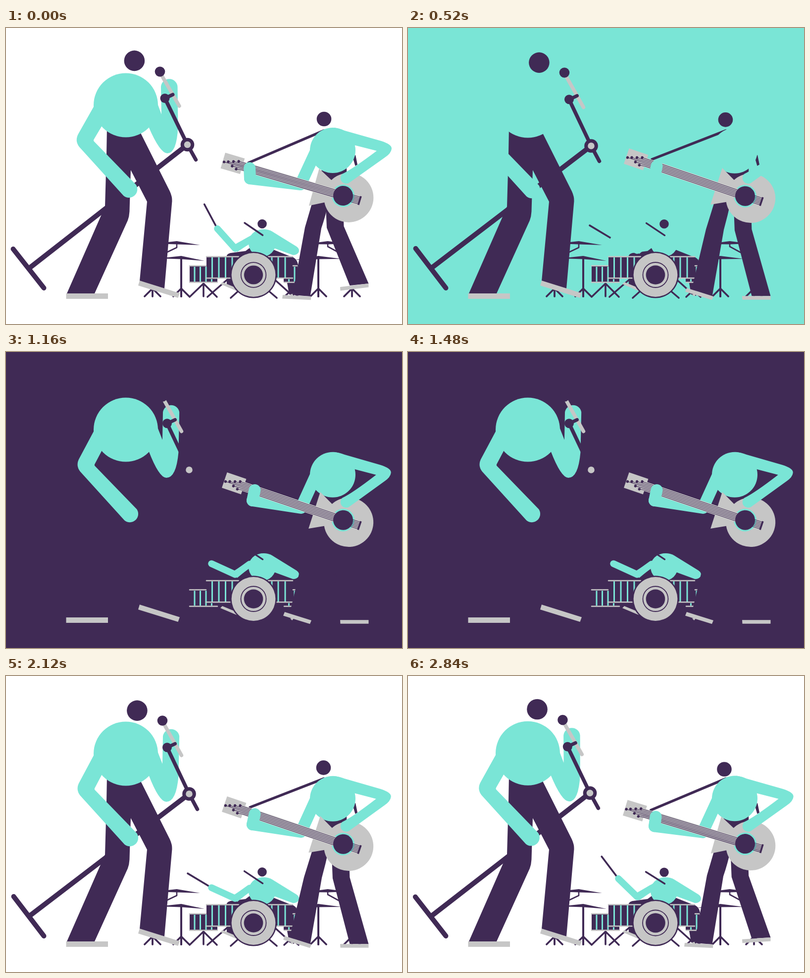
Animation of 800 by 600 pixels, one loop 2880 ms. Source, as an HTML page with a canvas:

```html
<!DOCTYPE html>
<html lang="en">
<head>
<meta charset="utf-8">
<title>Band</title>
<style>
html, body { margin: 0; width: 100%; height: 100%; overflow: hidden; }
canvas { display: block; width: 100vw; height: 100vh; }
</style>
</head>
<body>
<canvas id="stage" width="800" height="600"></canvas>
<script>
const ctx = document.getElementById('stage').getContext('2d');
const TEAL = '#7ae5d6', DARK = '#402a55', GRAY = '#c6c6c6';
const LOOP = 2880, STEP = 40, BEAT = 320;
const SCENES = [TEAL, DARK, '#ffffff'];

function shape(d, color) {
  ctx.fillStyle = color;
  ctx.fill(new Path2D(d));
}
function disc(x, y, r, color) {
  ctx.fillStyle = color;
  ctx.beginPath();
  ctx.arc(x, y, r, 0, Math.PI * 2);
  ctx.fill();
}
function line(d, width, color = DARK, cap = 'round') {
  ctx.strokeStyle = color;
  ctx.lineWidth = width;
  ctx.lineCap = cap;
  ctx.lineJoin = 'round';
  ctx.stroke(new Path2D(d));
}
function box(x1, y1, x2, y2, color) {
  ctx.fillStyle = color;
  ctx.fillRect(x1, y1, x2 - x1, y2 - y1);
}

// Movement values for one beat; sway and swing run 0..1 between the poses.
function poseAt(t) {
  const a = (t % BEAT) / BEAT * Math.PI * 2;
  return {
    sway: (1 - Math.cos(a - Math.PI / 8) / 0.924) / 2,
    swing: (1 - Math.cos(a)) / 1.707,
    nod: -0.495 + 0.495 * Math.cos(a) - 1.62 * Math.sin(a),
    slide: -11.9 * Math.sin(a),
    heel: Math.max(0, -Math.cos(a)) / 0.707,
    lift: (1 + Math.cos(a - 0.96)) / 1.574
  };
}

function tripod(x) {
  line(`M${x} 528V544M${x} 528L${x - 16} 544M${x} 528L${x + 16} 544`, 3.8);
}

function cymbals() {
  shape('M300 437L345 432L392 440L345 438.5Z', DARK);
  line('M345 436V445L322 456', 2.6);
  shape('M308 467L354 462L401 472L354 468.5Z', DARK);
  line('M354 466V544', 4);
  shape('M604 438L650 432L690 437L650 438.5Z', DARK);
  line('M650 436V443L672 455', 2.6);
  shape('M584 470L631 462L678 468L631 468.5Z', DARK);
  line('M631 466V544', 4);
  [296, 354, 631, 699].forEach(tripod);
}

function drummer({ sway, swing, nod }) {
  line('M399 516V544M399 518L371 545M399 518L426 545M447 510L407 545', 3.6);
  line('M545 512L576 540M562 545L576 532L591 545', 3.6);
  line('M474 529L454 547M526 529L547 547', 3.6);
  shape('M445 464Q446 456 458 455.5L484 452L492 446L542 450L572 462Q588 465 590 480' +
    'L582 543L572 540L560 470H470V530L446 524Z', DARK);
  shape('M437 515L466 527V533L433 519Z', GRAY);
  shape('M574 540L583 538L578 544Z', GRAY);

  const hx = 427 - 12 * swing, hy = 406.8 + 22.2 * swing, ey = 447 + 4 * swing;
  const tilt = (62 - 31 * sway) * Math.PI / 180;
  line(`M${hx} ${hy}l${-56 * Math.cos(tilt)} ${-56 * Math.sin(tilt)}`, 3.6);
  disc(517.5, 436, 27.5, TEAL);
  shape(`M517 408L460 ${ey - 7}L467 ${ey + 7}L491 438Z`, TEAL);
  line(`M492 430L463 ${ey}L${hx} ${hy}`, 13.5, TEAL);
  shape('M512 409Q526 406 537 412L587 443Q594 448 591 455Q587 461 579 460L541 446Z', TEAL);
  disc(517.5, 397 + nod * 0.8, 9.3, DARK);
  line(`M${482 - 1.5 * nod} ${395 + 2 * nod}L518.5 ${420 + nod}`, 3.4);
}

function drums({ nod }) {
  box(371, 483, 404, 515, DARK);
  box(405, 508, 427, 515, DARK);
  box(405, 464, 470, 507, DARK);
  box(536, 464, 580, 507, DARK);
  box(561, 508, 582, 515, DARK);
  box(584, 484, 589, 516, DARK);
  line('M381 484V514M392.5 484V514M404 484V514M415.5 509V514M571.5 509V514M583 484V514',
    3, TEAL, 'butt');
  line('M416.5 465V506M430 465V506M443.5 465V506M457 465V506M537 465V506M550 465V506M564 465V506',
    3, TEAL, 'butt');
  line('M371 482H404M405 463.5H470M404 507H455M371 515.5H427', 2.6, GRAY);
  line('M530 463.5H579M546 507H579M580 482H588M562 515.5H582', 2.6, GRAY);
  const pulse = 0.7 * nod;
  disc(500, 500.5, 47, DARK);
  disc(500, 500.5, 44.4, GRAY);
  disc(500, 500.5, 26.2 + pulse, DARK);
  disc(500, 500.5, 24.4 + pulse, GRAY);
  disc(500, 500.5, 19.1 + pulse, DARK);
}

function singer({ sway: s }) {
  const rx = 366.5 + 3.5 * s, ry = 236.5 + 2.5 * s;
  line(`M${rx} ${ry}L48 486`, 10);
  line(`M${14.5 + s} ${448 - s}L76.5 527`, 10);

  shape('M204 200L203 256L200 362L123 538H179L246 390Q249 382 249.5 372L252 288L285 352L270 513' +
    'L320 528L335.5 351Q336 342 331 331L268 205Z', DARK);
  box(121.5, 538, 206, 549, GRAY);
  shape('M270 512L351 537.5L347.5 547L267 522Z', GRAY);

  const x = 1.8 * s, y = 1.3 * s;
  disc(242, 156.5 + s, 65, TEAL);
  shape(`M178 ${158 + y}L${147 + x} ${213 + y}Q${138 + x} ${228 + y} ${148 + x} ${241 + y}
    L${237.5 + x} ${340 + y}A17 17 0 0 0 ${262.5 + x} ${317.5 + y}
    L${178 + x} ${230 + y}Q${176 + x} ${228 + y} ${178 + x} ${225 + y}L194 ${198 + y}Z`, TEAL);
  shape(`M303 145L${314 + 2 * s} ${175 + 3 * s}L${313 + 4 * s} ${120 + 2 * s}
    A16.8 16.8 0 0 1 ${346.6 + 3.6 * s} ${120 + 2 * s}L${347.5 + s} ${200 + 3 * s}
    Q${345 - s} ${254 + s} ${326 - 2 * s} ${254 + s}Q${311 - 2 * s} ${254 + s} 288 200Z`, TEAL);

  const jx = 321 + 4.5 * s, jy = 142.5 + 2.3 * s;
  line(`M${314 + 5 * s} ${95 + 2 * s}L${350 + 4.5 * s} ${158 + 2.8 * s}`, 7.4, GRAY);
  disc(311 + 5 * s, 88.5 + 2 * s, 10.3, DARK);
  disc(jx, jy, 9.5, DARK);
  line(`M${jx} ${jy}l16 -7.5`, 7);
  line(`M${jx} ${jy}L${rx} ${ry}L${383.5 + 3 * s} ${267 + 3 * s}`, 7.5);
  disc(rx, ry, 13.8, DARK);
  disc(rx, ry, 6.8, GRAY);
  disc(259.4 + 5.5 * s, 66.4 + 3.7 * s, 20.8, DARK);
}

// Drawn along its own axis, with the sound hole at the origin.
function guitar() {
  disc(12, 0.5, 50, GRAY);
  shape('M-62 -39L-32 -24L0 -20V22L-31 23L-60.5 39Z', GRAY);
  box(-253, -16, -212, 17, GRAY);
  box(-213, -9, -15, 9.8, GRAY);
  disc(0, 0, 23, TEAL);
  box(-26, -9, -15, 9.8, GRAY);
  const pegs = [[-222, -7], [-232, -3.7], [-242, -0.3], [-250, 2.6], [-232, 6], [-222.5, 9.5]];
  pegs.forEach(([x, y], i) => {
    const v = -6.8 + 2.9 * i;
    line(`M${x} ${y}L-211 ${v}L-15 ${v}L34 ${v - 0.5}`, 1.1);
    disc(x, y, 2.7, DARK);
  });
  disc(0, 0, 20, DARK);
  line('M34.8 -9.3V9', 3.6, DARK, 'butt');
}

function guitarist({ sway, swing, nod, slide, heel: k, lift: q }) {
  const angle = (16.5 + 2.3 * swing) * Math.PI / 180;
  const gx = 681, gy = 340 + 0.7 * swing;
  const cos = Math.cos(angle), sin = Math.sin(angle);
  const onNeck = (u, v) => `${gx + u * cos - v * sin} ${gy + u * sin + v * cos}`;

  line(`M${onNeck(-202, -10)}L642 208`, 5.2);
  shape('M706 257L710 277L705.5 279.5L701 264Z', DARK);

  const kx = 660 - 12 * q, hemL = 543.5 - 21.5 * q, hemR = 543.5 - 25.5 * q;
  shape(`M${kx - 2} 360L${kx} ${410 - 5 * q}L694.5 ${hemL}L732.5 ${hemR}
    L${kx + 34.5} ${408 - 6 * q}L${kx + 33} 360Z`, DARK);
  shape(`M675 ${543.5 - 18.5 * q}L732.5 ${hemR}V${551 - 25.5 * q}L675.5 ${551 - 18.5 * q}Z`, GRAY);
  shape(`M640 280H688L690 350L652 351Q646 380 ${637 + k} ${406 + 3 * k}L614.5 544
    L${579 - 6 * k} ${541 - 11 * k}L${604 - 2 * k} ${404 + 4 * k}L618 356Z`, DARK);
  shape(`M${559 + 4 * k} ${541 - 14 * k}L${616.3 + 0.7 * k} 544L${616 - 2 * k} 551.3
    L${558 + 2 * k} ${548.5 - 14 * k}Z`, GRAY);

  const by = 248 + 0.8 * sway;
  const wrist = `${493 + slide * 0.6} ${305 - 4 * swing}`;
  disc(660, by, 46, TEAL);
  line(`M626 250L${595 + sway} ${317 - sway}L${wrist}`, 24, TEAL);

  ctx.save();
  ctx.translate(gx, gy);
  ctx.rotate(angle);
  guitar();
  ctx.restore();

  line(`M${wrist}L${onNeck(-197 + slide, 0)}`, 24, TEAL);
  const e = -1.3 * sway;
  shape(`M662 ${by - 46}Q672 ${by - 45} 684 208L${758 + e} 229Q${780 + e} 236 ${779 + e} 245
    Q${778 + e} 254 ${766 + e} 262L693 314A11.5 11.5 0 0 1 679 296
    Q700 286 ${749 + e} 249L702 237Z`, TEAL);
  disc(642.5 - 3.5 * nod, 184.5 + 4.5 * nod, 14.8, DARK);
}

function draw(now) {
  const t = Math.floor((now % LOOP) / STEP) * STEP;
  const pose = poseAt(t);
  const scene = Math.floor(((t - STEP + LOOP) % LOOP) / (LOOP / 3));
  box(0, 0, 800, 600, SCENES[scene]);
  cymbals();
  drummer(pose);
  drums(pose);
  singer(pose);
  guitarist(pose);
}

const start = performance.now();
function tick() {
  draw(performance.now() - start);
  requestAnimationFrame(tick);
}
tick();
</script>
</body>
</html>
```
